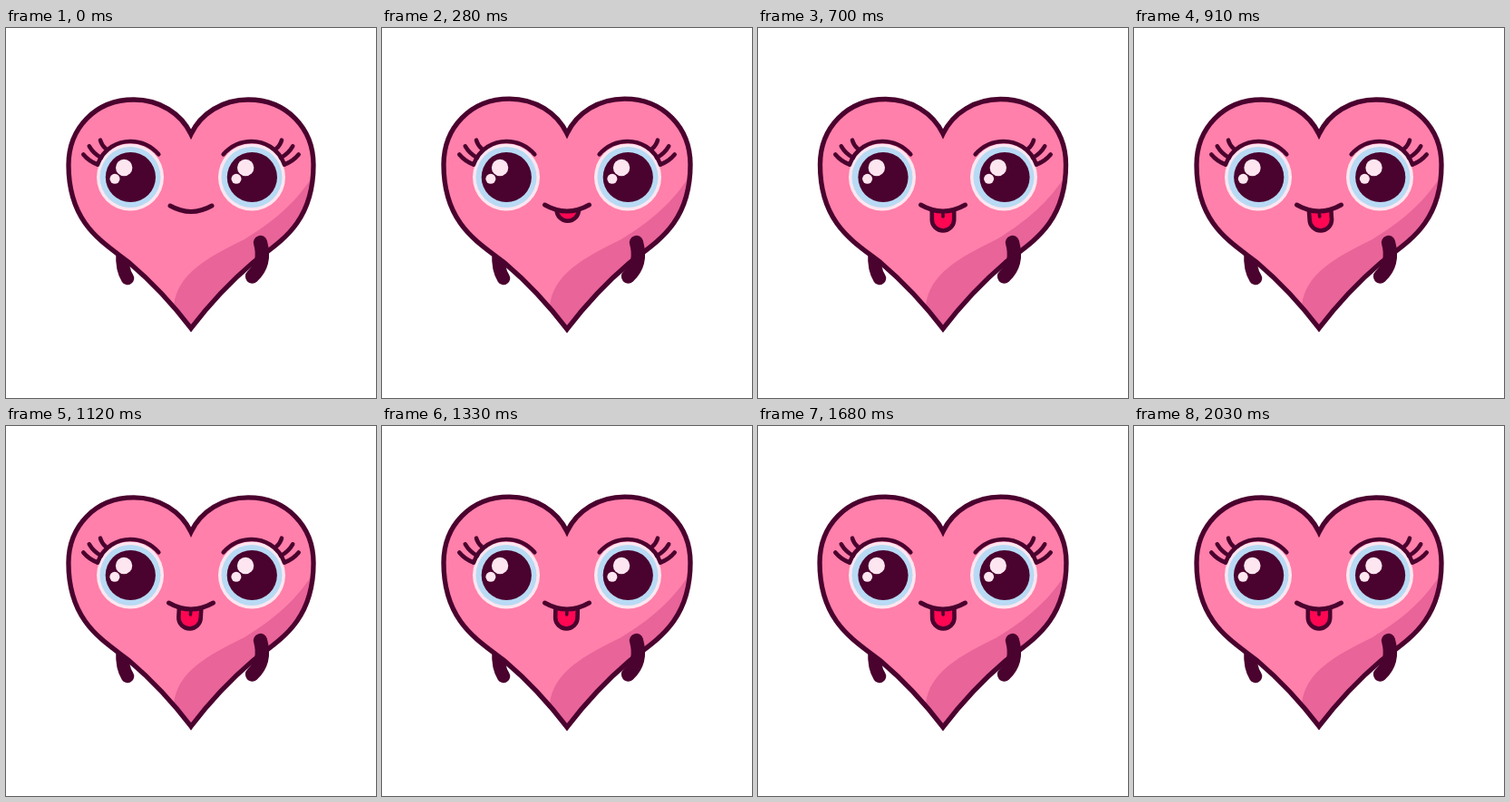
Recreate the animation shown at these times as an HTML page with a canvas. Size 408x408 px, loop 2.1 s.

```html
<!DOCTYPE html>
<html lang="en">
<head>
<meta charset="utf-8">
<title>Happy heart</title>
<style>
html, body { margin: 0; width: 100%; height: 100%; overflow: hidden; background: #fff; }
canvas { display: block; width: 408px; height: 408px; }
</style>
</head>
<body>
<canvas id="stage"></canvas>
<script>
const STEP = 70, STEPS = 30, SIZE = 408, MID = 204, TAU = Math.PI * 2;
const INK = '#4a022e', PINK = '#ff80aa', SHADE = '#e86499';
const CREAM = '#fde6f0', BLUE = '#b8daf4', RED = '#ff0753';

const canvas = document.getElementById('stage');
const ctx = canvas.getContext('2d');
const ratio = window.devicePixelRatio || 1;
canvas.width = canvas.height = SIZE * ratio;

const heart = new Path2D(
  'M204 117 C193 94 169 79 141 79 C98.5 79 69 110.5 69 151 ' +
  'C69 216.5 107.5 236.5 135.5 258.5 C162.5 281.5 186 307.5 204 331.2 ' +
  'C222 307.5 245.5 281.5 272.5 258.5 C300.5 236.5 339 216.5 339 151 ' +
  'C339 110.5 309.5 79 267 79 C239 79 215 94 204 117 Z');
const shade = new Path2D(
  'M341 158 C324 189 296 213 263 233 C222 253 189 271 185 306 L204 345 L350 320 Z');
const lid = new Path2D('M101 150.5 C108 132 124 125 137 125 C150 125 160 130 168.3 139.2');
const lashes = new Path2D(
  'M85.3 139.5 Q91.5 147 101 150.5 M91.8 130.3 Q96.5 138.5 105 143 M104 123.7 Q105.5 129.5 110.5 133.5');
const leftArm = new Path2D('M128.5 248 Q127.5 266 134 276');
const rightArm = new Path2D('M280.5 236.5 Q287 260 271.5 274');

function line(path, width) {
  ctx.lineWidth = width;
  ctx.strokeStyle = INK;
  ctx.stroke(path);
}

function disc(x, y, r, color) {
  ctx.fillStyle = color;
  ctx.beginPath();
  ctx.arc(x, y, r, 0, TAU);
  ctx.fill();
}

function mirrored(draw) {
  draw();
  ctx.save();
  ctx.translate(SIZE, 0);
  ctx.scale(-1, 1);
  draw();
  ctx.restore();
}

function smooth(x) {
  x = Math.min(1, Math.max(0, x));
  return x * x * (3 - 2 * x);
}

function body(scale) {
  ctx.save();
  ctx.translate(MID, 205);
  ctx.scale(scale, scale);
  ctx.translate(-MID, -205);
  ctx.fillStyle = PINK;
  ctx.fill(heart);
  ctx.save();
  ctx.clip(heart);
  ctx.fillStyle = SHADE;
  ctx.fill(shade);
  ctx.restore();
  ctx.lineJoin = 'miter';
  line(heart, 5.3);
  ctx.restore();
}

function eye(x, look) {
  const y = 164.5;
  disc(x, y, 37, CREAM);
  disc(x, y, 33.5, BLUE);
  x += look;
  disc(x, y, 27.6, INK);
  disc(x - 7.2, y - 10.5, 9.2, CREAM);
  disc(x - 17.4, y + 1.8, 5.5, CREAM);
}

function mouth(out, wag) {
  const grow = Math.min(1, out * 2);
  const x = 181 - 1.5 * grow, y = 196 - grow;
  const smile = `M${x} ${y} Q${MID} 209 ${SIZE - x} ${y}`;
  if (out > 0) {
    // The tongue slides out from behind the lip.
    const r = 12.2, low = 201 + 22.5 * out;
    const tongue = new Path2D();
    tongue.arc(MID + wag, low - r, r, 0, Math.PI);
    tongue.lineTo(MID - r, 185);
    tongue.lineTo(MID + r, 185);
    tongue.closePath();
    ctx.save();
    ctx.clip(new Path2D(`${smile} V240 H${x} Z`));
    ctx.fillStyle = RED;
    ctx.fill(tongue);
    line(tongue, 4.6);
    const crease = 7 * Math.max(0, 2 * out - 1);
    if (crease) line(new Path2D(`M204 201 L${MID + wag * 0.4} ${201 + crease}`), 3.6);
    ctx.restore();
  }
  line(new Path2D(smile), 4.9);
}

function draw(n) {
  const wave = 0.5 + 0.5 * Math.cos(TAU * (n / 15 - 0.43));
  const out = smooth((n - 0.4) / 7);
  const wag = 2 * out * Math.sin(TAU * (n - 10) / 9.5);
  const look = 0.6 + 0.4 * Math.cos(TAU * (n - 10) / 15);

  ctx.setTransform(ratio, 0, 0, ratio, 0, 0);
  ctx.fillStyle = '#fff';
  ctx.fillRect(0, 0, SIZE, SIZE);
  ctx.lineCap = 'round';
  line(leftArm, 14.5);
  body(1 + 0.013 * wave * wave);
  ctx.lineJoin = 'round';
  line(rightArm, 15.3);
  eye(137, look);
  eye(271, look);
  mirrored(() => {
    line(lid, 4.6);
    line(lashes, 4.6);
  });
  mouth(out, wag);
}

const start = performance.now();
function tick() {
  const time = Math.max(0, performance.now() - start);
  draw(Math.floor(time / STEP) % STEPS);
  requestAnimationFrame(tick);
}
tick();
</script>
</body>
</html>
```
